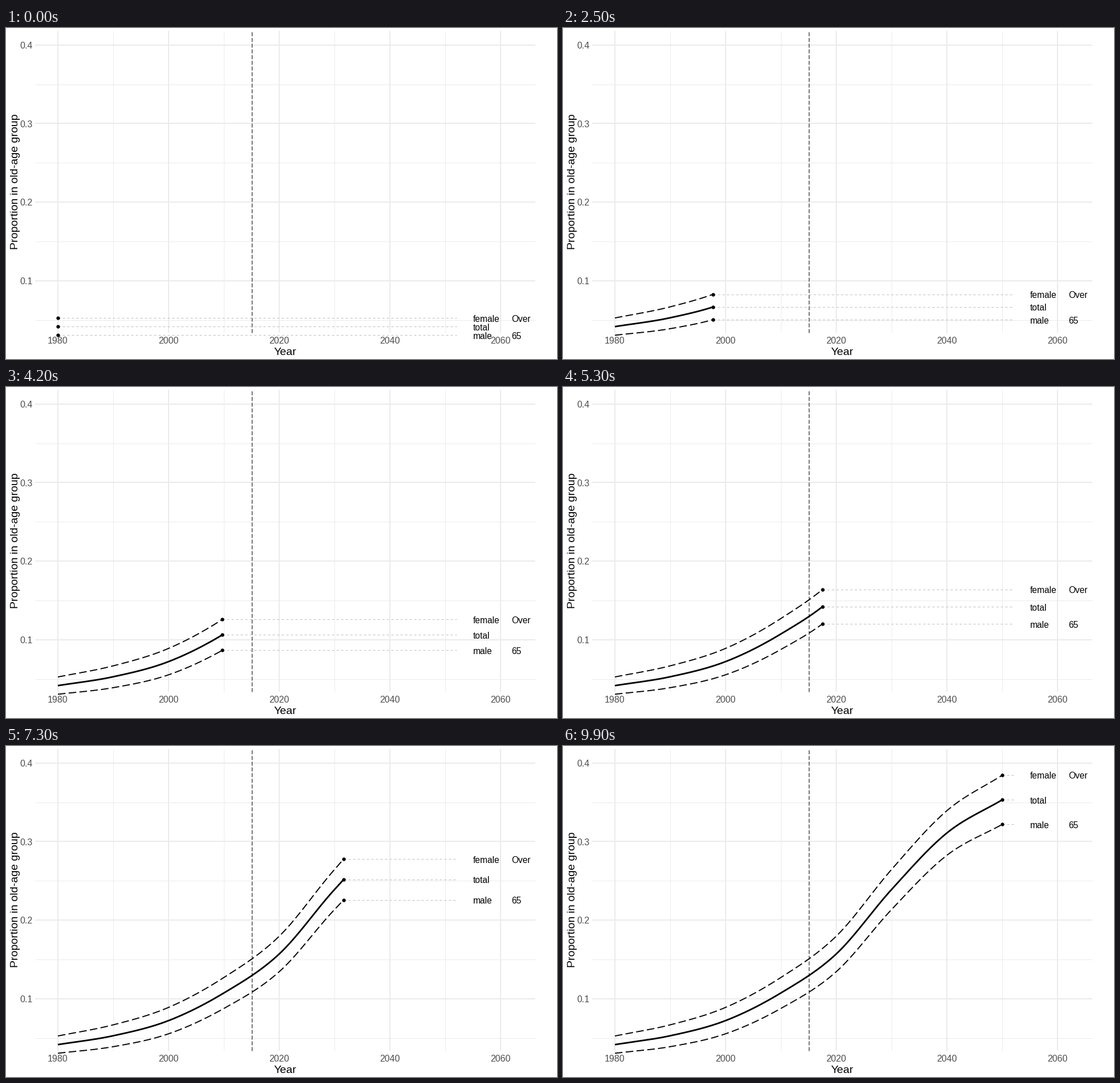
Write a matplotlib script that moves like this. It is 966 px wide and 580 px high and loops after 10 s.

```python
import numpy as np
import matplotlib.pyplot as plt
from matplotlib.animation import FuncAnimation

W, H, DPI = 966, 580, 100
PX = 72 / DPI  # one pixel in points
FRAMES, INTERVAL = 100, 100
START, END = 1980, 2050

LEFT, RIGHT, TOP, BOTTOM = 51, 928, 5, 534
GRID, TICK, LEADER = "#EBEBEB", "#4D4D4D", "#BEBEBE"
LONG_DASH, DASH = (7, 3), (4, 4)

plt.rcParams["font.family"] = "Liberation Sans"

# Total share at the start of each decade
decades = np.array([.0415, .0528, .0721, .1073, .1570, .2391, .3110, .3532])
slopes = np.gradient(decades)


def total_share(year):
    """Cubic Hermite curve through the decade values."""
    t = (np.asarray(year) - START) / 10
    k = np.clip(t.astype(int), 0, len(decades) - 2)
    u = t - k
    rise = u * u * (3 - 2 * u)
    return (decades[k] * (1 - rise) + decades[k + 1] * rise
            + u * (1 - u) * (slopes[k] * (1 - u) - slopes[k + 1] * u))


def share(year, side):
    """Women lie above the total and men below, by a slowly widening gap."""
    return total_share(year) + side * (.0110 + .00029 * (year - START))


def to_x(year):
    return 91 + 9.704 * (year - START)


def to_y(value):
    return 580.4 - 1376.7 * value


fig = plt.figure(figsize=(W / DPI, H / DPI), dpi=DPI, facecolor="white")
ax = fig.add_axes([0, 0, 1, 1])
ax.set_xlim(0, W)
ax.set_ylim(H, 0)
ax.axis("off")


def line(x, y, color, width=1, dashes=None, z=2):
    style = "-" if dashes is None else (0, dashes)
    return ax.plot(x, y, color=color, lw=width * PX, ls=style, zorder=z,
                   clip_on=False, solid_capstyle="butt",
                   dash_capstyle="butt")[0]


def text(x, y, s, size, color="black", ha="left", **kw):
    return ax.text(x, y, s, fontsize=size * PX, color=color, ha=ha,
                   va="baseline", zorder=5, **kw)


def draw_axes():
    for k in range(9):
        x, major = to_x(START + 10 * k), k % 2 == 0
        line([x, x], [BOTTOM, TOP], GRID, 1 + major, z=0)
        if major:
            text(x, 553, str(START + 10 * k), 16, TICK, "center")
    for k in range(1, 9):
        y, major = to_y(k * .05), k % 2 == 0
        line([LEFT, RIGHT], [y, y], GRID, 1 + major, z=0)
        if major:
            text(46.5, y + 6.3, f"{k * .05:.1f}", 16, TICK, "right")
    text(489, 573, "Year", 19.5, ha="center")
    text(21, 269, "Proportion in old-age group", 19.5, ha="center",
         rotation=90, rotation_mode="anchor")
    line([to_x(2015)] * 2, [BOTTOM, TOP], "black", dashes=LONG_DASH)


class Series:
    """A growing curve with its end point, leader and labels."""

    def __init__(self, name, side, note=""):
        self.side = side
        width, dashes = (1.9, LONG_DASH) if side else (2.8, None)
        self.curve = line([], [], "black", width, dashes, z=3)
        self.leader = line([], [], LEADER, dashes=DASH)
        self.dot = ax.plot([], [], "o", color="black", ms=6.3 * PX, mew=0,
                           zorder=4, clip_on=False)[0]
        self.labels = [text(818.7, 0, name, 15.5), text(886.3, 0, note, 15.5)]

    def update(self, year):
        years = np.append(np.arange(START, year, .5), year)
        xs, ys = to_x(years), to_y(share(years, self.side))
        x, y = xs[-1], ys[-1]
        self.curve.set_data(xs, ys)
        self.leader.set_data([x, to_x(2052)], [y, y])
        self.dot.set_data([x], [y])
        for label in self.labels:
            label.set_y(y + 6.4)
        return [self.curve, self.leader, self.dot, *self.labels]


draw_axes()
series = [Series("female", 1, "Over"), Series("total", 0), Series("male", -1, "65")]


def update(i):
    year = START + (END - START) * i / (FRAMES - 1)
    return [artist for s in series for artist in s.update(year)]


anim = FuncAnimation(fig, update, frames=FRAMES, interval=INTERVAL,
                     init_func=lambda: update(0), repeat=True, repeat_delay=0)
plt.show()
```
